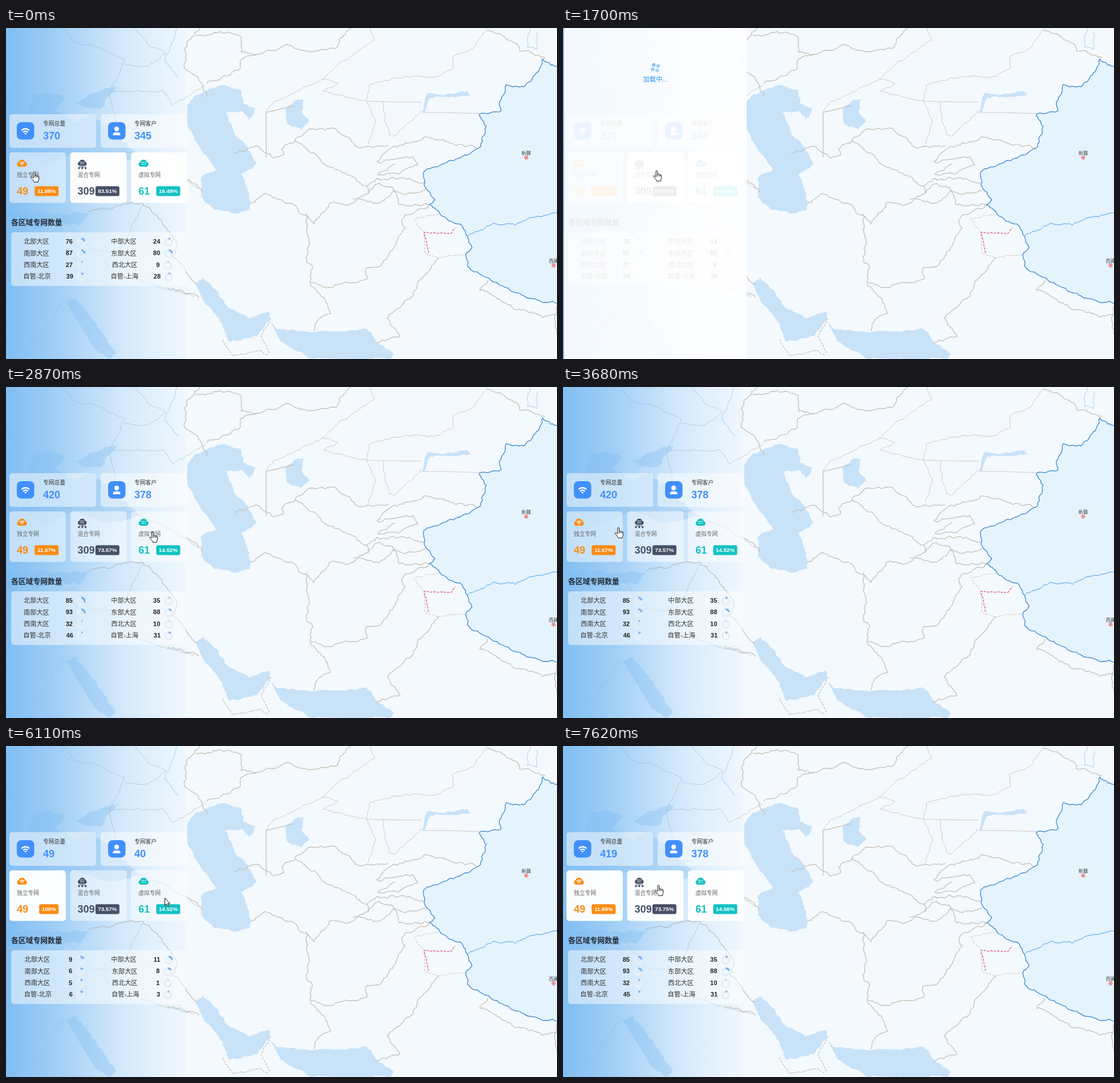
An HTML page that plays this animation: 966x580 px, repeating every 8 s.

```html
<!DOCTYPE html>
<html lang="zh-CN">
<head>
<meta charset="utf-8">
<style>
html, body { margin: 0; width: 100%; height: 100%; overflow: hidden; background: #f4f9fe; }
svg { display: block; width: 966px; height: 580px; }
text { font-family: "Liberation Sans", "Noto Sans CJK SC", "Noto Sans CJK JP", sans-serif; }
</style>
</head>
<body>
<svg viewBox="0 0 966 580">
  <defs>
    <linearGradient id="fade">
      <stop offset="0" stop-color="#7dbcf2" stop-opacity=".97"/>
      <stop offset=".3" stop-color="#7dbcf2" stop-opacity=".68"/>
      <stop offset=".65" stop-color="#86c2f4" stop-opacity=".3"/>
      <stop offset="1" stop-color="#a0d4f8" stop-opacity=".06"/>
    </linearGradient>
  </defs>
  <g id="map" fill="none" stroke-linejoin="round"></g>
  <rect width="315" height="580" fill="url(#fade)"/>
  <g id="panel"></g>
  <g id="cursor" fill="#fff" stroke="#111" stroke-linejoin="round"></g>
</svg>
<script>
const $ = id => document.getElementById(id);
const text = (x, y, s, size, fill, more = '') =>
  `<text x="${x}" y="${y}" font-size="${size}" fill="${fill}" ${more}>${s}</text>`;
const bold = 'font-weight="700"', middle = 'text-anchor="middle"';

// ---- map: key points joined by seeded fractal coastlines ----
let seed = 11, map = '';
const rnd = () => (seed = seed * 16807 % 2147483647) / 2147483647 - .5;

function wander([ax, ay], [bx, by], amp) {
  const len = Math.hypot(bx - ax, by - ay);
  if (len < 6) return `L${bx.toFixed(1)} ${by.toFixed(1)}`;
  const k = rnd() * Math.min(.45, amp / len);
  const mid = [(ax + bx) / 2 + (ay - by) * k, (ay + by) / 2 + (bx - ax) * k];
  return wander([ax, ay], mid, amp) + wander(mid, [bx, by], amp);
}
function draw(style, amp, ...lines) {
  for (const line of lines) {
    const p = line.split(' ').map(s => s.split(',').map(Number));
    const d = p.slice(1).map((b, i) => wander(p[i], b, amp)).join('');
    map += `<path d="M${p[0]}${d}" ${style}/>`;
  }
}
const tan = 'stroke="#c8c2ba" stroke-width="1.4"', dash = 'stroke-dasharray="4 2"';

draw('fill="#c8e2f8"', 3,
  '330,120 380,100 411,108 416,133 438,141 426,162 416,147 385,148 404,190 424,208 439,238 412,256 427,290 428,318 405,325 365,319 342,296 342,262 368,249 343,215 318,170 318,135 330,120',
  '490,142 508,126 522,125 518,146 532,164 517,178 492,166',
  '729,146 738,115 780,115 808,110 815,118 744,122 733,148',
  '332,447 346,437 370,460 386,486 425,509 460,497 463,510 440,540 390,549 378,516 347,480',
  '462,512 474,527 540,533 632,527 652,552 680,571 672,580 535,580 482,550');
draw('fill="#c8e2f8"', 5,
  '48,120 78,113 104,124 88,146 125,165 150,150 190,182 240,225 180,238 120,216 70,240 25,220 30,170',
  '122,130 140,121 194,102 170,138 138,140',
  '0,322 146,324 130,346 0,350',
  '104,478 124,474 192,572 180,580 155,562');

draw('stroke="#c2c6ca" stroke-width=".9"', 3,
  '638,0 646,22 585,60 558,88 520,105 468,130 456,148',
  '553,88 582,97 556,111 632,128',
  '782,50 785,70 758,85 700,85 637,100 632,128 648,165 636,203',
  '661,129 672,187 680,190 727,145',
  '845,0 820,35 783,50',
  '100,0 120,25 165,35 207,55 182,112 240,112 275,110 292,135 350,100',
  '0,76 14,92 24,118 60,118',
  '225,0 250,30 280,45 250,66 208,64',
  '182,112 205,215 290,250 338,282',
  '0,575 58,545 100,480',
  '100,330 150,390 200,390 240,310',
  '170,400 190,430 330,470');
draw('stroke="#c2c6ca" stroke-width=".9"', 0, '632,128 661,129 729,130', '729,148 770,148 830,150');
draw('stroke="#b8daf6" stroke-width="1.3"', 4, '300,0 278,58 302,86', '918,0 914,34 930,38 930,8');

draw(tan, 5,
  '340,0 313,38 312,66 338,92 352,120',
  '333,13 375,6 412,15 412,42 440,46 497,30 530,42 581,33 584,20 605,1',
  '440,46 412,55 411,70 386,84 352,97',
  '843,5 895,27 900,40 945,52',
  '400,219 440,207 470,228 487,222 483,212 507,197 530,215 563,242 632,277 635,290 600,310 567,307 540,343 505,310 455,290 428,308',
  '507,197 533,177 577,176 612,207 670,206',
  '527,325 531,373 527,410 538,420 533,445 570,455 633,440 632,420 655,418 685,375 700,350 694,335 744,309',
  '608,300 650,307 680,285 690,310 744,309',
  '533,447 560,478 569,500 548,510 540,531',
  '758,402 735,432 708,475 668,508 691,540 650,552',
  '845,442 831,460 890,492 940,507 966,503',
  '650,234 678,208 735,190 832,211',
  '650,234 690,228 713,225 722,240 690,255 652,257 682,238',
  '632,277 650,264 697,262 735,271',
  '636,290 655,272 700,292 735,284',
  '240,307 266,330 300,380 292,400 336,449',
  '283,455 338,472',
  '145,322 205,308 240,307',
  '316,262 330,272 344,288',
  '965,486 962,512 965,535');
draw(tan, .5, '505,136 456,148 456,227');
draw(tan + dash, 2, '380,546 398,575 445,565 460,575', '464,508 447,540 462,572');
draw('stroke="#c2bfbc"' + dash, 3, '763,324 715,335 735,360 735,395 758,403 806,398');
draw('stroke="#e0698f" stroke-width="1.5"' + dash, 2, '741,394 733,358 780,360 787,350');

draw('fill="#e5f3fd" stroke="#3c87cb" stroke-width="1.3"', 4,
  '980,72 955,65 941,54 928,82 908,103 877,99 865,135 868,145 830,151 842,172 832,208 800,225 735,250 733,275 752,301 743,310 765,330 800,347 817,385 806,398 812,420 850,442 890,463 945,481 980,484');
draw('stroke="#3f9cf0"', 4, '809,365 855,342 893,346 930,330 966,324');

for (const [x, y, s] of [[912, 227, '新疆'], [960, 416, '西藏']])
  map += text(x, y - 5, s, 8.2, '#444', middle) +
    `<circle cx="${x}" cy="${y}" r="2.8" fill="#fff" stroke="#e0393e"/><circle cx="${x}" cy="${y}" r="1.2" fill="#e0393e"/>`;
$('map').innerHTML = map;

// ---- data: networks of each kind per region; every other figure follows ----
const regions = ['北部大区', '中部大区', '南部大区', '东部大区', '西南大区', '西北大区', '自管-北京', '自管-上海'];
const kinds = [
  { name: '独立专网', color: '#fa8c16', per: [9, 11, 6, 8, 5, 1, 6, 3] },
  { name: '混合专网', color: '#485068', per: [57, 21, 70, 72, 24, 8, 35, 22] },
  { name: '虚拟专网', color: '#13c2c2', per: [19, 3, 17, 8, 3, 1, 4, 6] }
];
const sum = a => a.reduce((x, y) => x + y, 0);

// start, chosen kinds, clients; the first entry only seeds the shares
const states = [
  [-9e3, '012', 378], [0, '12', 345], [1940, '2', 58], [2870, '', 378],
  [5410, '0', 40], [6380, '02', 96], [7470, '012', 378]
].map(([start, on, clients]) => ({ start, on, clients }));
const loads = [[1700, 2060], [2720, 2870], [5170, 5410], [6260, 6380], [7230, 7470]];

// With nothing chosen all kinds count, plus one network of no kind.
// Only counted kinds get a new share; the others keep the last one.
let share = [];
for (const s of states) {
  const used = s.on || '012';
  s.counts = regions.map((_, r) => sum([...used].map(k => kinds[k].per[r])) + (!s.on && r == 6));
  s.total = sum(s.counts);
  share = s.share = kinds.map((k, i) =>
    used.includes(i) ? +(sum(k.per) / s.total * 100).toFixed(2) + '%' : share[i]);
}

// ---- panel ----
const box = (x, y, w, h, r, fill, o = 1) =>
  `<rect x="${x}" y="${y}" width="${w}" height="${h}" rx="${r}" fill="${fill}" fill-opacity="${o}"/>`;
const wifi = (x, y, s) => `<g transform="translate(${x} ${y}) scale(${s})" fill="none" stroke="#fff" stroke-width="2.2">
  <path d="M-7-1.5Q0-7.5 7-1.5M-4.2 1.7Q0-2 4.2 1.7"/><path d="M-2.2 3.6Q0 2 2.2 3.6L0 6Z" fill="#fff" stroke="none"/></g>`;
const user = '<path d="M187.5 188v-1a4 4 0 0 1 4-4h5a4 4 0 0 1 4 4v1Z" fill="#fff"/><circle cx="194" cy="177" r="4.2" fill="#fff"/>';

function cloud(i, x, color) {
  const inner = i ? '<path d="M5 6.5h8M5 9.8h8" stroke="#fff" stroke-width="1.1" stroke-dasharray="5 1 4"/>' : wifi(9, 8.6, .6);
  const nodes = '<path d="M9 14v4M2.5 18v-2h13v2" fill="none" stroke="#485068"/>' +
    [2.5, 9, 15.5].map(c => `<circle cx="${c}" cy="18.5" r="1.9"/>`).join('');
  return `<g transform="translate(${x} 229) scale(${i == 1 ? .9 : 1})" fill="${color}">
    <path d="M4 14a4.1 4.1 0 0 1-.7-8A6 6 0 0 1 14.7 6 4.1 4.1 0 0 1 14 14Z"/>${inner}${i == 1 ? nodes : ''}</g>`;
}

const ring = (x, y, part) => `<g fill="none" stroke-width="3.4" transform="rotate(-90 ${x} ${y})">
  <circle cx="${x}" cy="${y}" r="6" stroke="#e6eff9"/>
  <circle cx="${x}" cy="${y}" r="6" stroke="#78b1ee" pathLength="100" stroke-dasharray="${(part * 100).toFixed(1)} 200"/></g>`;

const tile = (x, icon, name, value) => box(x, 151, 152, 59, 5, '#fff', .5) +
  box(x + 13, 165, 30.5, 30.5, 8, '#418ffb') + icon +
  text(x + 59, 170.5, name, 9.75, '#333') + text(x + 59, 195, value, 18, '#418ffb', bold);

function loader(time) {
  const dots = [.55, .7, .8, .65].map((o, i) =>
    `<circle cx="4" cy="4" r="3.2" fill-opacity="${o}" transform="rotate(${i * 90})"/>`).join('');
  return box(2, 0, 320, 580, 0, '#fff', .9) +
    `<g transform="translate(162 69.5) rotate(${(12 + time * .3).toFixed(1)})" fill="#69b1f6">${dots}</g>` +
    text(162, 93.5, '加载中...', 11.2, '#2d8ff0', middle);
}

function panel(t) {
  const n = states.findLastIndex(s => t >= s.start);
  const now = states[n], prev = states[n - 1];
  const ease = 1 - (1 - Math.min(1, (t - now.start) / 320)) ** 3;
  const grown = t < states[2].start ? 1 : ease;

  let s = tile(6, wifi(34.2, 181, 1), '专网总量', now.total) + tile(166, user, '专网客户', now.clients);

  kinds.forEach(({ name, color, per }, i) => {
    const x = 6 + i * 106.6, tx = x + 13, label = now.share[i], w = label.length > 4 ? 42 : 34;
    s += box(x, 218, 98.8, 88.5, 5, '#fff', now.on.includes(i) ? .96 : .5) + cloud(i, tx, color) +
      text(tx, 260.8, name, 9.75, '#666') + text(tx, 291.8, sum(per), 18, color, bold) +
      box(x + 86.2 - w, 277.3, w, 17.2, 3, color) +
      text(x + 86.2 - w / 2, 289.4, label, 9.75, '#fff', bold + middle);
  });

  s += text(9, 344.7, '各区域专网数量', 12.8, '#262c36', bold) + box(9, 358, 306, 94, 5, '#fff', .5);
  regions.forEach((name, i) => {
    const x = i % 2 * 153.3, y = 374 + (i >> 1) * 20.3, count = now.counts[i];
    const short = count < 10 ? 1.5 : 0, wide = name.length > 4 ? .8 : 0;
    const from = prev.counts[i] / prev.total, to = count / now.total;
    s += text(x + 31 + short - wide, y + 4.2, name, 11.2, '#333') +
      text(x + 117 - short * .6 + wide, y + 4, count, 11, '#222', bold + 'text-anchor="end"') +
      ring(x + 132 - short, y + 1.3, from + (to - from) * grown);
  });

  const load = loads.find(([a, b]) => t >= a && t < b);
  return load ? s + loader(t - load[0]) : s;
}

// ---- cursor: each move is start, steps, left, top ----
const moves = [[0, 1, 43, 251], [1150, 3, 158, 249], [2210, 4, 251, 253], [3290, 4, 61, 244], [5560, 5, 278, 266], [6780, 3, 161, 243]];
const hand = 'M5 12V2.4a1.4 1.4 0 0 1 2.8 0V7.8a1.3 1.3 0 0 1 2.5.3 1.3 1.3 0 0 1 2.4.6 1.1 1.1 0 0 1 1.9.9V13c0 2.2-1.3 3.2-1.3 6.2H6.4C6 16.5 3 14.5 1 11.5c-.7-1.3.7-2.3 1.9-1.3ZM7.8 8v3M10.3 8.5V11M12.6 9v2';
const arrow = 'M.5.5V13.5l3-2.7 2.2 4.9 2-.9-2.2-4.8h3.8Z';

function cursor(t) {
  const n = moves.findLastIndex(m => t >= m[0]);
  const [start, steps, x, y] = moves[n], [, , px, py] = moves[Math.max(0, n - 1)];
  const q = Math.min(1, (Math.floor((t - start) / 135) + 1) / steps);
  const e = q * q * (3 - 2 * q);
  const shape = n == 4 && q == 1 ? arrow : hand;
  return `<path transform="translate(${px + (x - px) * e} ${py + (y - py) * e})" d="${shape}"/>`;
}

const shown = {};
function show(id, html) {
  if (shown[id] !== html) $(id).innerHTML = shown[id] = html;
}
function frame() {
  const t = performance.now() % 8000;
  show('panel', panel(t));
  show('cursor', cursor(t));
  requestAnimationFrame(frame);
}
frame();
</script>
</body>
</html>
```
